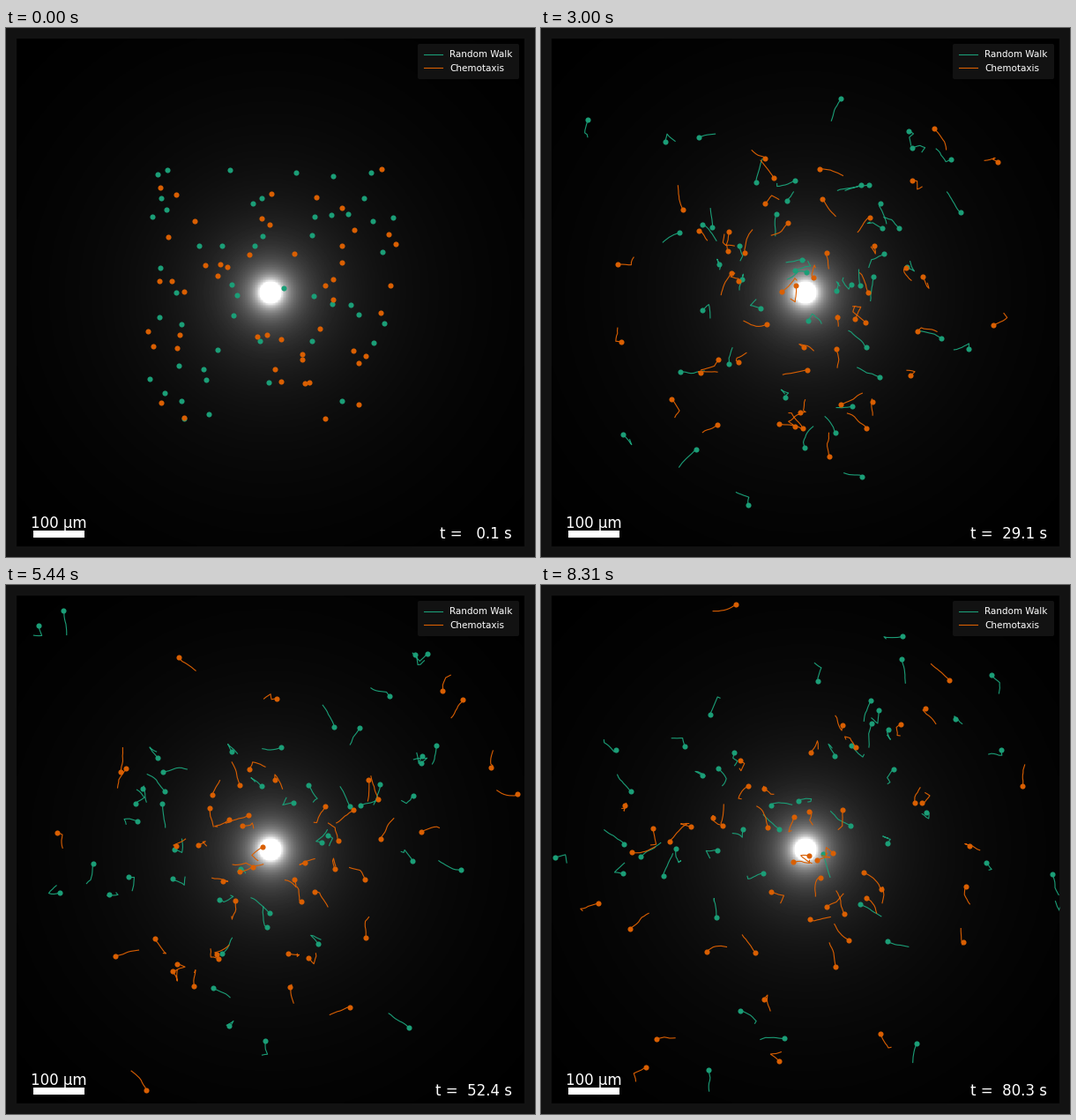
Write a matplotlib script that moves like this. It is 600 by 600 pixels and loops after 8.33 s.

```python
import numpy as np
import matplotlib.pyplot as plt
from matplotlib.animation import FuncAnimation
from matplotlib.patches import Rectangle

LOOP_MS = 8330
FRAMES = 300
DT = 80.2 / (FRAMES - 1)      # simulated seconds per frame
T0 = 0.1
PX_PER_UM = 0.576
STEP = 20 * PX_PER_UM * DT    # swimming at 20 um/s
TUMBLE = 0.15                 # tumble chance per frame
TURN = 0.14                   # rotational noise, rad per frame
TRAIL = 10                    # positions kept in each trail
CELLS = 50                    # per species
CENTER = np.array([300.0, 300.0])
SPREAD = 250 * PX_PER_UM      # half side of the starting square
LO, HI = 12, 588
GREEN, ORANGE, DARK = "#1b9e77", "#d95f02", "#121212"


def swim(seed, gain):
    """Run-and-tumble paths; gain > 0 shortens runs that lead away from the centre."""
    rng = np.random.default_rng(seed)
    pos = CENTER + rng.uniform(-SPREAD, SPREAD, (CELLS, 2))
    angle = rng.uniform(0, 2 * np.pi, CELLS)
    path = [pos]
    for _ in range(FRAMES - 1):
        heading = np.column_stack([np.cos(angle), np.sin(angle)])
        away = pos - CENTER
        r = np.hypot(*away.T) + 1e-9
        outward = (heading * away).sum(axis=1) / r
        chance = TUMBLE * (1 + gain * outward * 20 / (r + 20))
        tumbling = rng.random(CELLS) < chance
        pos = pos + STEP * heading * ~tumbling[:, None]
        fresh = rng.uniform(0, 2 * np.pi, CELLS)
        angle = np.where(tumbling, fresh, angle + rng.normal(0, TURN, CELLS))
        path.append(pos)
    return np.array(path)


def trail(path, i):
    """Recent stretch of every path, joined with NaN gaps."""
    part = path[max(0, i - TRAIL + 1):i + 1]
    gap = np.full((1,) + part.shape[1:], np.nan)
    return np.concatenate([part, gap]).transpose(1, 0, 2).reshape(-1, 2).T


fig = plt.figure(figsize=(6, 6), dpi=100, facecolor=DARK)
ax = fig.add_axes([0.02, 0.02, 0.96, 0.96])

# Attractant field, falling off as 1/r
g = np.linspace(-288, 288, 200)
field = 12.5 / np.hypot(*np.meshgrid(g, g)) - 0.03
ax.imshow(field, cmap="gray", vmin=0, vmax=1, extent=(LO, HI, HI, LO))
ax.set(xlim=(LO, HI), ylim=(HI, LO))
ax.axis("off")

groups = []
for name, color, seed, gain, z in [
    ("Random Walk", GREEN, 11, 0.0, 2),
    ("Chemotaxis", ORANGE, 23, 0.6, 3),
]:
    line, = ax.plot([], [], color=color, lw=0.8, label=name, zorder=z)
    dots, = ax.plot([], [], "o", color=color, ms=4.4, mew=0, zorder=z)
    groups.append((swim(seed, gain), line, dots))

legend = ax.legend(loc="upper right", fontsize=7.5, borderpad=0.7,
                   borderaxespad=0.58, facecolor=DARK, framealpha=1,
                   labelcolor="white")
legend.get_frame().set_linewidth(0)

ax.add_patch(Rectangle((31.2, 570), 57.6, 8, color="white", lw=0, zorder=5))
ax.text(60, 567, "100 µm", color="white", size=12, ha="center", zorder=5)
clock = ax.text(574, 579, "", color="white", size=12, ha="right", zorder=5)


def update(i):
    for path, line, dots in groups:
        line.set_data(*trail(path, i))
        dots.set_data(*path[i].T)
    clock.set_text(f"t = {T0 + i * DT:5.1f} s")
    return [clock]


anim = FuncAnimation(fig, update, frames=FRAMES, interval=LOOP_MS / FRAMES,
                     repeat=True, repeat_delay=0)
plt.show()
```
